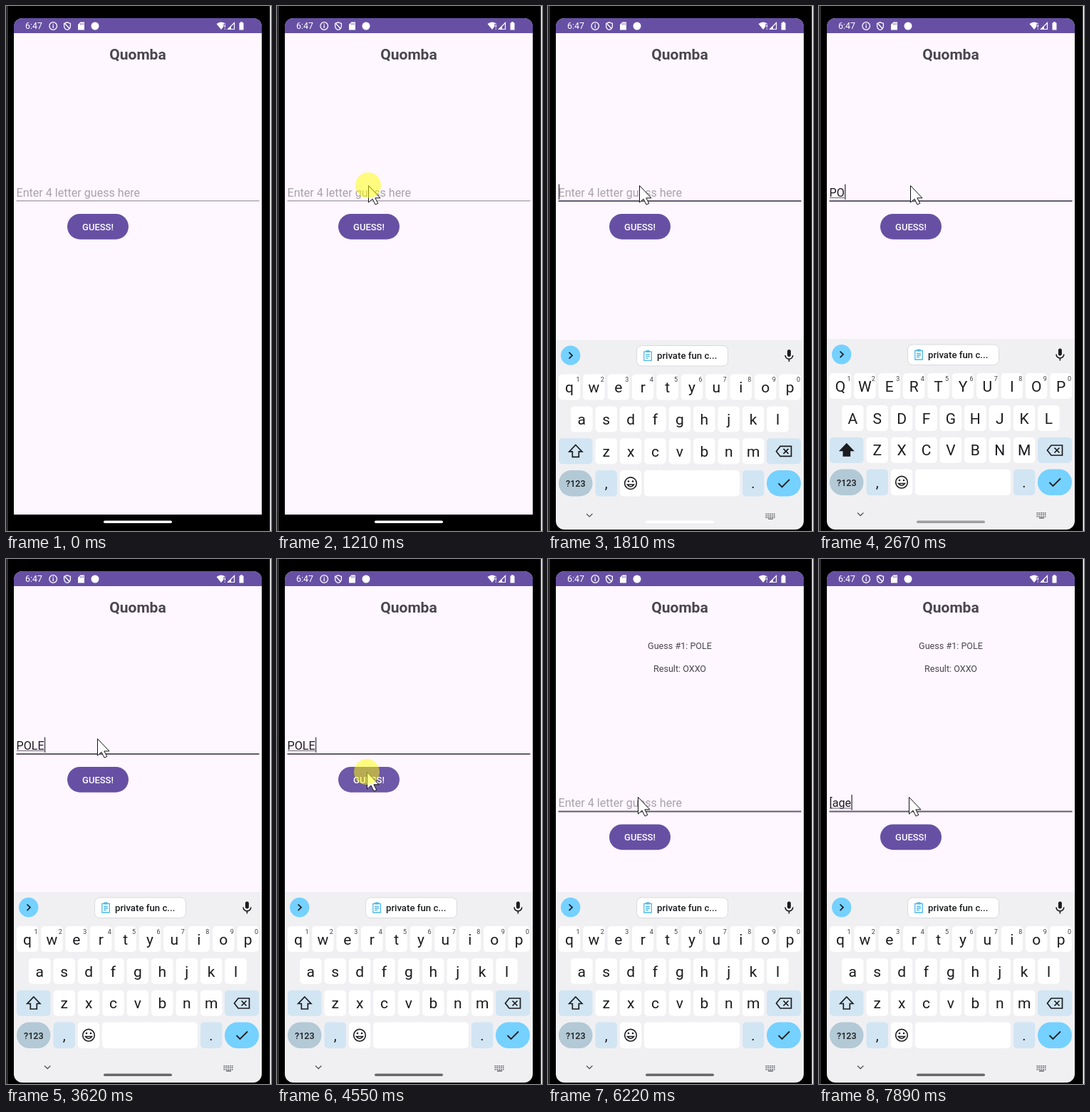
These frames come from a looping animation (372 px wide and 735 px high, 8 s). An HTML page with a canvas:

```html
<!DOCTYPE html>
<html lang="en">
<head>
<meta charset="utf-8">
<title>Word guessing game</title>
<style>
html, body { margin: 0; width: 100%; height: 100%; overflow: hidden; background: #000; }
canvas { display: block; }
</style>
</head>
<body>
<canvas id="stage" width="372" height="735"></canvas>
<script>
const c = document.getElementById('stage').getContext('2d');
const LOOP = 8000, SHIFT = 4690;
const PURPLE = '#6750a4', PAPER = '#fef7ff', INK = '#49454f', KEY_INK = '#1b1c1f';
const SKY = '#75d1ff', PALE = '#d2e5f3';

// [time, text in the field]
const TYPED = [[0, ''], [1440, ''], [2150, 'P'], [2600, 'PO'], [2810, 'POL'], [3150, 'POLE'],
  [SHIFT, ''], [7350, '['], [7550, '[a'], [7820, '[ag'], [7890, '[age']];
// [time, x, y] of the pointer tip
const PATH = [[530, 241, 381], [870, 160, 250], [1040, 134, 219], [1210, 128, 251],
  [3620, 128, 251], [3890, 126, 298], [5230, 126, 298], [5550, 126, 333]];

const clamp = v => Math.max(0, Math.min(1, v));
const ramp = (t, a, b) => clamp((t - a) / (b - a));
const within = (t, a, b) => t >= a && t < b;

function box(x, y, w, h, r, color, border) {
  c.beginPath();
  c.roundRect(x, y, w, h, r);
  c.fillStyle = color;
  c.fill();
  if (border) { c.strokeStyle = border; c.lineWidth = 1; c.stroke(); }
}
function disc(x, y, r, color) {
  c.beginPath();
  c.arc(x, y, r, 0, 7);
  c.fillStyle = color;
  c.fill();
}
function fill(d, color) {
  c.fillStyle = color;
  c.fill(new Path2D(d));
}
function line(d, color, width) {
  c.strokeStyle = color;
  c.lineWidth = width;
  c.stroke(new Path2D(d));
}
function text(s, x, y, size, color, align = 'center', weight = 400) {
  c.font = `${weight} ${size}px Roboto, sans-serif`;
  c.textAlign = align;
  c.fillStyle = color;
  c.fillText(s, x, y);
}

function statusBar() {
  box(11, 17, 348, 21, 0, PURPLE);
  text('6:47', 27, 32.3, 12.4, '#fff', 'left');
  line('M71.5 28a5.3 5.3 0 1 1-10.6 0a5.3 5.3 0 1 1 10.6 0M66.2 27v4M66.2 24.8v1.4', '#fff', 1.3);
  line('M86 22.8l4.4 1.7v3.4q0 4-4.4 5.6q-4.400-1.600-4.400-5.600v-3.400zM83 25l6 6.500', '#fff', 1.3);
  fill('M104.500 22.500h5.500v11h-9v-7.500z', '#fff');
  line('M104.500 24v2.500M106.500 24v2.500M108.500 24v2.500', PURPLE, .8);
  disc(125, 28, 5.5, '#fff');
  fill('M295.500 25q6.500-5 13 0l-6.500 8z', '#fff');
  line('M307 25v5M307 31.500v1.500', PURPLE, 3);
  line('M307.300 26v4M307.300 31.500v1.300', '#fff', 1.2);
  line('M320.500 23.500v9h-9z', '#fff', 1.2);
  fill('M311 33l5-5v5z', '#fff');
  fill('M327.500 23.500h1.500v-1.200h3v1.200h1.500v10h-6z', '#fff');
}

function field(t, dy) {
  let i = TYPED.length - 1;
  while (TYPED[i][0] > t) i--;
  const [since, typed] = TYPED[i];
  const focused = t >= 1400;
  text(typed || 'Enter 4 letter guess here', 14.5, 266.5 + dy, 16.1,
    typed ? '#1d1b20' : '#a8a2aa', 'left');
  const end = 14.5 + (typed ? c.measureText(typed).width : 0);
  if (typed) box(15, 268 + dy, end - 15, 1, 0, '#6d6872');
  if (focused) box(14.5, 272 + dy, 341, 2, 0, '#645c70');
  else box(14.5, 272, 341, 1.5, 0, '#aea6b2');
  if (t >= 1440 && Math.floor((t - since) / 510) % 2 === 0)
    box(end + .2, 249.5 + dy, 1.6, 21.5, 0, '#5c5568');
}

function button(t, dy) {
  box(86, 291 + dy, 86, 35.7, 17.85, PURPLE);
  const glow = .1 * ramp(t, 4420, SHIFT) * (1 - ramp(t, 4890, 5090));
  if (glow) box(86, 291 + dy, 86, 35.7, 17.85, `rgba(255,255,255,${glow})`);
  text('GUESS!', 129, 313.7 + dy, 13, '#fff', 'center', 500);
}

function keyRow(letters, x, y, upper) {
  [...letters].forEach((ch, i) => {
    const cx = x + 34.4 * i;
    box(cx - 15.2, y - 18, 30.4, 36, 5, '#fff');
    text(upper ? ch.toUpperCase() : ch, cx, y + 7.5, 21, KEY_INK);
  });
}

function toolbar() {
  disc(31.7, 487.7, 13.7, SKY);
  line('M29.500 483.500l4.500 4.300l-4.500 4.300', KEY_INK, 1.7);
  box(124.5, 474, 128, 28.5, 7, '#fff', '#d8dade');
  line('M134.800 482.500h10.500v12.500h-10.500zM137 486.500h6M137 489h6M137 491.500h4', '#4fb9e6', 1.3);
  box(137.3, 480.5, 5.5, 3, 1, '#4fb9e6');
  text('private fun c...', 153, 493, 13.2, KEY_INK, 'left', 500);
  box(335.9, 479.5, 5, 10, 2.5, KEY_INK);
  line('M333 487.500a5.400 5.400 0 0 0 10.800 0M338.400 493v3.500', KEY_INK, 1.6);
}

function keyboard(t) {
  const upper = within(t, 2490, 3280);
  const drop = 270 * (1 - ramp(t, 1600, 1870)) ** 3.43;
  c.save();
  c.translate(0, drop);
  box(11, 466, 348, 290, 0, '#f0f0f3');
  toolbar();
  keyRow('qwertyuiop', 30, 532, upper);
  [...'1234567890'].forEach((n, i) => text(n, 42 + 34.4 * i, 524.5, 9, '#3c3e42'));
  keyRow('asdfghjkl', 47.3, 577, upper);
  keyRow('zxcvbnm', 81.7, 621.7, upper);

  box(15, 603.7, 47.5, 36, 5, PALE);
  const arrow = 'M38.800 613l9 9.500h-4.500v7.500h-9v-7.500h-4.500z';
  if (upper) fill(arrow, KEY_INK);
  line(arrow, KEY_INK, 1.7);
  box(307, 603.7, 48, 36, 5, PALE);
  line('M320.500 622l5.500-7h15.500v14h-15.500zM330.500 618.500l7 7M337.500 618.500l-7 7', KEY_INK, 1.7);

  box(15, 648.5, 47.5, 36.5, 18, '#b3c9d6');
  text('?123', 38.8, 671.5, 12.5, KEY_INK, 'center', 500);
  box(66.5, 648.5, 30.4, 36.5, 5, PALE);
  text(',', 81.7, 674, 20, KEY_INK);
  box(100.9, 648.5, 30.4, 36.5, 5, '#fff');
  line('M124.300 666.700a8.300 8.300 0 1 1-16.600 0a8.300 8.300 0 1 1 16.600 0M111.500 668.500q4.500 6 9 0z', KEY_INK, 1.6);
  disc(113, 664, 1.3, KEY_INK);
  disc(119, 664, 1.3, KEY_INK);
  box(135, 648.5, 134, 36.5, 5, '#fff');
  box(272.9, 648.5, 30.4, 36.5, 5, PALE);
  text('.', 288, 674, 20, KEY_INK);
  box(307, 648.5, 48, 36.5, 18, SKY);
  line('M323.500 667l5 5l10.500-10.500', KEY_INK, 1.8);

  line('M54 709.500l4.200 4l4.200-4', '#55575c', 1.3);
  for (let i = 0; i < 15; i++)
    box(305.5 + i % 5 * 2.8, 709 + Math.floor(i / 5) * 2.5, 1.8, 1.6, 0, '#66686d');
  box(309, 716, 7, 1.4, 0, '#66686d');
  c.restore();
}

function pointer(t) {
  if (t < 130) return;
  let i = 0;
  while (i < PATH.length - 2 && t >= PATH[i + 1][0]) i++;
  const [t0, x0, y0] = PATH[i], [t1, x1, y1] = PATH[i + 1];
  const p = ramp(t, t0, t1);
  const x = x0 + (x1 - x0) * p, y = y0 + (y1 - y0) * p;
  c.save();
  c.translate(x, y);
  const shape = 'M.5 .5v23.500l5.500-5l4 8l3.800-1.700l-4-7.500h7.200z';
  fill(shape, '#fff');
  line(shape, '#111', 1);
  c.restore();
  if (within(t, 1210, 1340) || within(t, 4420, 4620)) disc(x, y, 18, 'rgba(255,255,0,.5)');
}

function draw(t) {
  const shifted = t >= SHIFT, dy = shifted ? 80.5 : 0;
  box(0, 0, 372, 735, 0, '#000');
  box(1, 0, 1, 735, 0, '#66666c');
  box(370, 0, 1, 735, 0, '#77777d');
  box(371, 0, 1, 735, 0, '#fff');

  c.save();
  c.beginPath();
  c.roundRect(11, 17, 348, 716, 12);
  c.clip();
  box(11, 17, 348, 695, 0, PAPER);
  statusBar();
  text('Quomba', 185, 75.3, 21, INK, 'center', 700);
  if (shifted) {
    text('Guess #1: POLE', 185, 126.3, 12.6, INK);
    text('Result: OXXO', 185, 158, 12.6, INK);
  }
  field(t, dy);
  button(t, dy);
  if (t >= 1670) keyboard(t);
  const shade = 255 - 97 * ramp(t, 2000, 2210) - 53 * ramp(t, 3010, 3350);
  box(137, 720.5, 96, 3.4, 1.7, `rgb(${shade},${shade},${shade})`);
  c.restore();
  pointer(t);
}

const start = performance.now();
(function tick() {
  draw((performance.now() - start) % LOOP);
  requestAnimationFrame(tick);
})();
</script>
</body>
</html>
```
